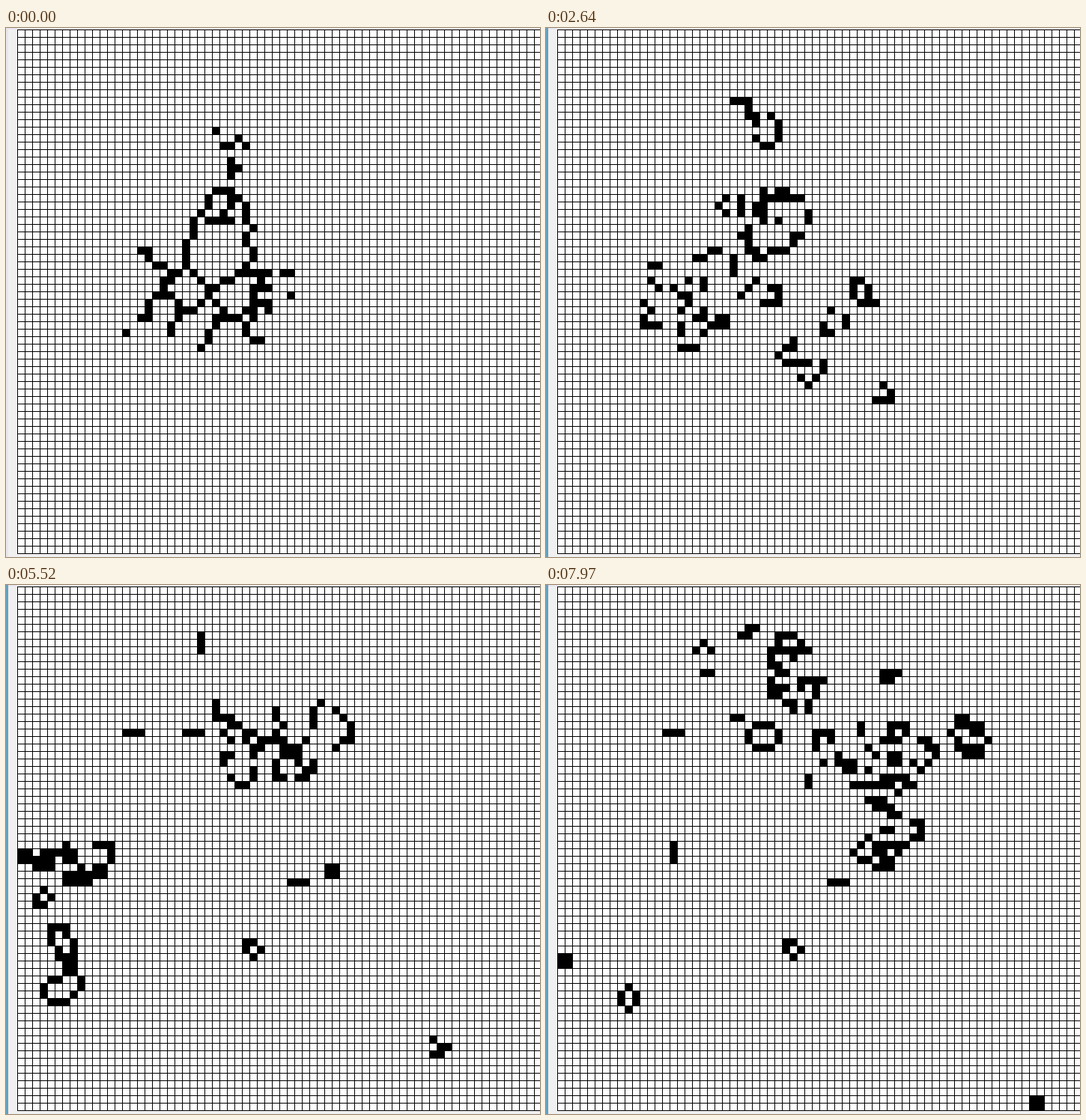
Animation of 713 by 707 pixels, one loop 8 s. Source, as an HTML page:

```html
<!DOCTYPE html>
<html lang="en">
<head>
<meta charset="utf-8">
<title>Game of Life</title>
<style>
  html, body { margin: 0; width: 100%; height: 100%; overflow: hidden; background: #f0f0f0; }
  svg { display: block; shape-rendering: crispEdges; }
</style>
</head>
<body>
<svg width="713" height="707" viewBox="0 0 713 707">
  <rect width="713" height="707" fill="#f0f0f0"/>
  <rect width="713" height="2" fill="#e9e6f0"/>
  <rect id="edge" width="3" height="707"/>
  <rect x="15" y="2" width="698" height="701" fill="#fff"/>
  <path id="grid"/>
  <path id="cells"/>
</svg>
<script>
const LOOP = 8000, COLS = 70, ROWS = 70, CELL = 10, LEFT = 15, TOP = 2;
const $ = id => document.getElementById(id);

// Live columns of the starting pattern, row by row.
const FIRST_ROW = 13;
const SEED = `26/29/27-28 30//28/28-29/28//26-28/25 28-29/25 28 30/24 27 30/
23 25-28 30/23 31/23 30/22 30/16-17 22 31/17 22 31/18-19 22 30/
20-21 23 29-33 35-36/19-20 24 27-28 32/19 25-26 31-33/18-20 25 31 36/
17 21 24 26 31-33/17 21-23 27 30-31 33/16-17 21 26-29 31/20 26 30/
14 20 25 30/25 31-32/24`;

// Repaint ticks: first time, last time, number of ticks.
const TICKS = [
  [50, 850, 18], [900, 1210, 8], [1260, 1690, 10], [1730, 2480, 17],
  [2540, 2640, 3], [2700, 3340, 14], [3380, 3770, 9], [3820, 4170, 9],
  [4210, 4860, 14], [4910, 5010, 3], [5070, 5870, 17], [5930, 6180, 7],
  [6220, 6700, 12], [6750, 7520, 17], [7570, 7970, 9]
].flatMap(([a, b, n]) => Array.from({ length: n }, (_, i) => Math.floor(a + (b - a) * i / (n - 1))));

// The run stalls for a few ticks in the middle.
const STALL_AT = 65, STALL = 8;

const alive = (g, x, y) => x >= 0 && y >= 0 && x < COLS && y < ROWS ? g[y * COLS + x] : 0;

function parse(text) {
  const g = new Uint8Array(COLS * ROWS);
  text.replace(/\n/g, '').split('/').forEach((row, i) => {
    for (const run of row.split(' ').filter(Boolean)) {
      const [a, b = a] = run.split('-').map(Number);
      for (let x = a; x <= b; x++) g[(FIRST_ROW + i) * COLS + x] = 1;
    }
  });
  return g;
}

function evolve(g) {
  return g.map((on, i) => {
    const x = i % COLS, y = (i - x) / COLS;
    let n = -on;
    for (let dy = -1; dy <= 1; dy++)
      for (let dx = -1; dx <= 1; dx++) n += alive(g, x + dx, y + dy);
    return n === 3 || (on && n === 2) ? 1 : 0;
  });
}

const history = [parse(SEED)];
while (history.length <= TICKS.length) history.push(evolve(history[history.length - 1]));

// The escaping glider passes this spot on tick 26, which fixes the initial wait.
const GLIDER = '..##.#.##', GLIDER_X = 34, GLIDER_Y = 40, GLIDER_TICK = 26;
const pass = history.findIndex(g => [...GLIDER].every((c, i) =>
  alive(g, GLIDER_X + i % 3, GLIDER_Y + Math.floor(i / 3)) === (c === '#' ? 1 : 0)));
const wait = pass < 0 ? 0 : Math.max(0, GLIDER_TICK - pass);

function generation(tick) {
  const stalled = Math.min(Math.max(tick - STALL_AT, 0), STALL);
  return Math.max(0, tick - stalled - wait);
}

function outline(g) {
  let d = '';
  g.forEach((on, i) => {
    if (!on) return;
    const x = i % COLS, y = (i - x) / COLS;
    d += `M${LEFT + x * CELL} ${TOP + y * CELL}h11v11h-11z`;
  });
  return d;
}

let lines = '';
for (let i = 0; i <= ROWS; i++) {
  lines += `M${LEFT} ${TOP + i * CELL}h700v1h-700z`;
  lines += `M${LEFT + i * CELL} ${TOP}h1v701h-1z`;
}
$('grid').setAttribute('d', lines);

let shown = -1;
function draw(t) {
  const tick = TICKS.filter(at => at <= t).length;
  if (tick === shown) return;
  shown = tick;
  $('edge').setAttribute('fill', tick ? '#61a3c5' : '#e6e6ec');
  $('cells').setAttribute('d', outline(history[generation(tick)]));
}

const begin = performance.now();
function loop(now) {
  draw(Math.max(0, now - begin) % LOOP);
  requestAnimationFrame(loop);
}
draw(0);
requestAnimationFrame(loop);
</script>
</body>
</html>
```
